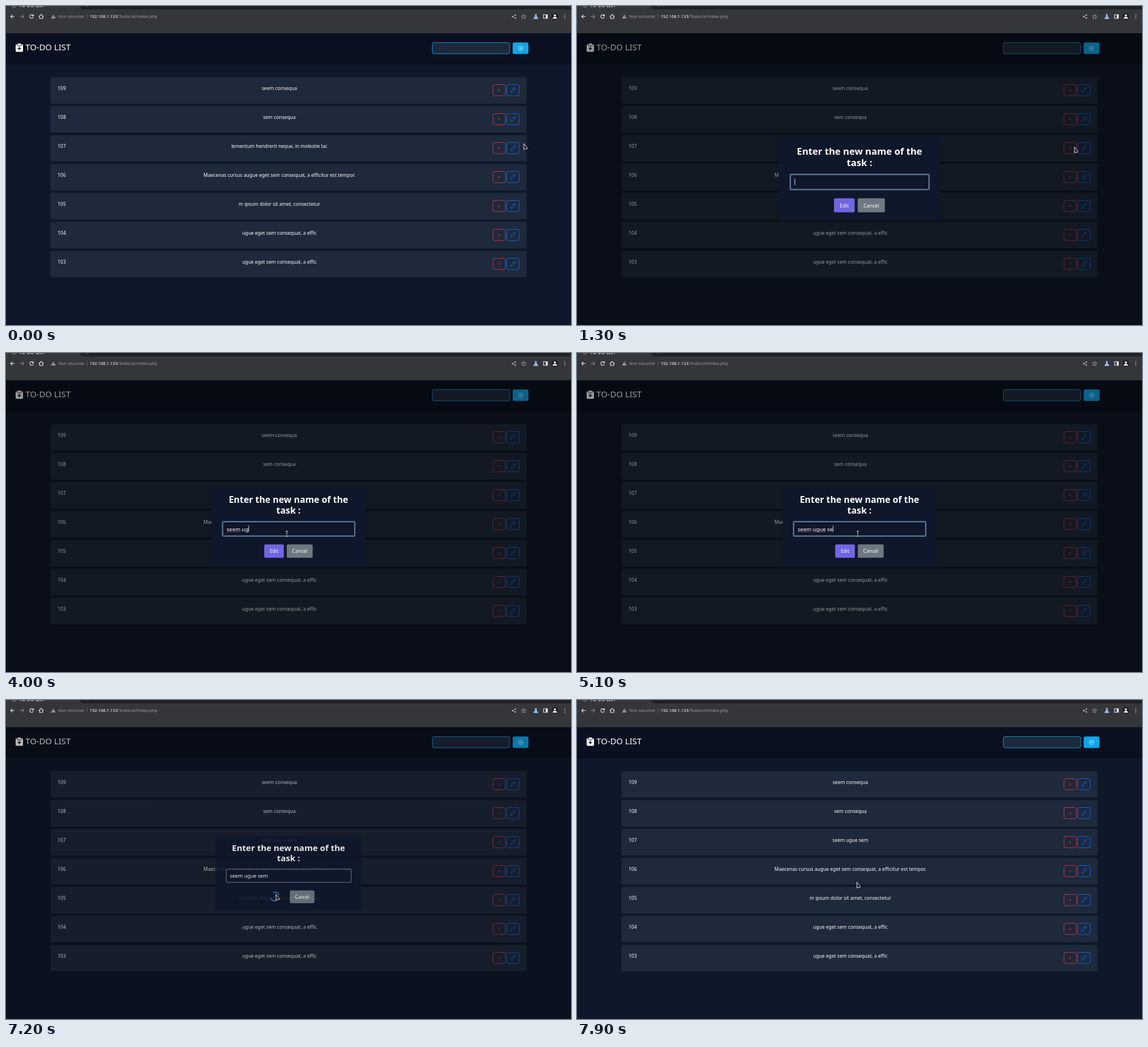
Write an HTML page that moves like this. It is 996 px wide and 562 px high and loops after 8 s.

```html
<!DOCTYPE html>
<html lang="en">
<head>
<meta charset="utf-8">
<title>To-do list</title>
<style>
  html, body { margin: 0; width: 100%; height: 100%; overflow: hidden; background: #0f172a; }
  svg { display: block; width: 996px; height: 562px; }
  text { font-family: "Noto Sans", "Open Sans", sans-serif; font-size: 8.47px; fill: #fff; }
  .mid { text-anchor: middle; }
  .url { font-size: 7.5px; }
  .mute { fill: #9aa0a6; }
  .line { fill: none; stroke: #e8eaed; stroke-width: 1.1; }
  .dim { stroke: #84878c; }
  .btn { fill: none; stroke-width: .9; }
  .del { stroke: #dc3545; }
  .edit { stroke: #0d6efd; }
  .icon { fill: none; stroke-width: .8; stroke-linejoin: round; }
  .hot .btn { fill: #0d6efd; }
  .hot .icon { stroke: #fff; }
  .brand { font-size: 14.8px; font-weight: 500; }
  .heading { font-size: 15.85px; font-weight: 700; }
  .label { font-weight: 500; }
  .typed { font-size: 9.5px; }
  .wavy { stroke: #e5384a; stroke-dasharray: 1.1 .9; }
</style>
</head>
<body>
<svg viewBox="0 0 996 562">
  <!-- browser bar -->
  <rect width="996" height="48" fill="#35363a"/>
  <path d="M131 0Q131.500 6 136 6H996V0Z" fill="#202124"/>
  <text x="23" y="1.800">TO-DO LIST</text>
  <circle class="line dim" cx="14.500" cy="-1" r="3.200"/>
  <path class="line dim" d="M141 -1H147M144 -3V1.500"/>
  <path class="line" d="M15 18.500H8.500M11.500 15.300L8.200 18.500L11.500 21.700"/>
  <path class="line dim" d="M24.500 18.500H31M28 15.300L31.300 18.500L28 21.700"/>
  <path class="line" d="M47.700 16.700A3.200 3.200 0 1 0 48.200 19.400M48.400 14.800V17.500H45.700"/>
  <path class="line" d="M57.700 18.800L62 14.800L66.300 18.800M59.300 17.700V22H64.700V17.700"/>
  <path d="M83.500 14.700L87.600 22H79.400Z" fill="#9aa0a6"/>
  <path d="M83.500 17.200V19.500M83.500 20.200V21" stroke="#35363a" stroke-width=".8"/>
  <text class="url mute" x="92" y="21.300">Non sécurisé</text>
  <path d="M143 14V23" stroke="#6b6e73" stroke-width=".8"/>
  <text class="url" x="147.500" y="21.300">192.168.1.133<tspan class="mute">/TodoList/index.php</tspan></text>
  <g fill="#c4c7cb" stroke="#c4c7cb" stroke-width=".7">
    <path d="M898 16L893 18.700L898 21.300" fill="none"/>
    <circle cx="898" cy="16" r=".9"/><circle cx="893" cy="18.700" r=".9"/><circle cx="898" cy="21.300" r=".9"/>
    <path fill="none" d="M912.500 14.700L913.600 17.400L916.500 17.600L914.300 19.500L915 22.300L912.500 20.800L910 22.300L910.700 19.500L908.500 17.600L911.400 17.400Z"/>
  </g>
  <path d="M932.300 14.800H935.700M933 15V17.700L930.300 21.700Q930 22.500 931 22.500H937Q938 22.500 937.700 21.700L935 17.700V15Z" fill="#8ab4f8" stroke="#c6dafc" stroke-width=".6"/>
  <path d="M947.600 15.300H954.400V21.700H947.600Z" class="line"/>
  <path d="M951.500 15.300H954.400V21.700H951.500Z" fill="#e8eaed"/>
  <circle cx="967.500" cy="18.500" r="6" fill="#202124"/>
  <circle cx="967.500" cy="16.700" r="1.900" fill="#fff"/>
  <path d="M963.700 22.300Q963.700 19.300 967.500 19.300T971.300 22.300Z" fill="#fff"/>
  <path d="M985 15.500V22" stroke="#e8eaed" stroke-width="1.600" stroke-linecap="round" stroke-dasharray="0 3"/>

  <!-- page -->
  <rect y="48" width="996" height="514" fill="#0f172a"/>
  <rect y="48" width="996" height="55" fill="#0a1020"/>
  <rect x="17" y="67.500" width="13" height="13.300" rx="1.800" fill="#fff"/>
  <rect x="20" y="65.800" width="7" height="4.500" rx="1" fill="#fff" stroke="#0a1020" stroke-width=".9"/>
  <path d="M23.500 72V78M20.500 75H26.500" stroke="#0a1020" stroke-width="1.500"/>
  <text class="brand" x="34.300" y="78">TO-DO LIST</text>
  <rect x="751.500" y="64.500" width="136.300" height="19.700" rx="3" fill="#1e293b" stroke="#0ea5e9" stroke-width=".9"/>
  <rect x="893.200" y="64.200" width="27.800" height="20.300" rx="3" fill="#0ea5e9"/>
  <g fill="none" stroke="#fff" stroke-width=".7">
    <circle cx="907.200" cy="74.500" r="3.900"/><path d="M905.300 74.500H909.100M907.200 72.600V76.400"/>
  </g>
  <g id="rows"></g>
  <rect id="shade" y="48" width="996" height="514"/>

  <!-- dialog -->
  <g id="dialog">
    <rect x="362.500" y="236" width="271" height="138" rx="2.600" fill="#0f172a"/>
    <text class="heading mid" x="498" y="264">Enter the new name of the</text>
    <text class="heading mid" x="498" y="283.300">task :</text>
    <rect id="ring" x="381.200" y="296.500" width="234.200" height="26.600" rx="2" fill="none" stroke="#6496c8" stroke-opacity=".5" stroke-width="1.600"/>
    <rect id="field" x="382.200" y="297.500" width="232.200" height="24.600" rx="1.500" fill="none" stroke-width=".7"/>
    <text id="typed" class="typed" x="389" y="313.600"></text>
    <path id="marks" class="wavy"/>
    <rect id="caret" y="304" width=".8" height="11.300" fill="#fff"/>
    <g id="confirm">
      <rect id="confirmBox" x="455.200" y="337.200" width="34.600" height="23.600" rx="2"/>
      <text class="label mid" x="472.500" y="352.200">Edit</text>
    </g>
    <circle id="loader" cx="472.700" cy="348.600" r="8.300" fill="none" stroke="#2778c4" stroke-width="2.100" pathLength="4" stroke-dasharray="1 1"/>
    <g id="cancel">
      <rect x="495" y="337.200" width="45.600" height="23.600" rx="2" fill="#6e7881"/>
      <text class="label mid" x="517.800" y="352.200">Cancel</text>
    </g>
  </g>

  <path id="arrow" d="M0 0L.3 10.300L2.700 8.900L5.700 9.200L6.100 6.900Z" fill="#16181c" stroke="#fff" stroke-width=".9" stroke-linejoin="round"/>
  <g id="beam" fill="none">
    <path d="M-2 -4.600H2M0 -4.600V4.600M-2 4.600H2" stroke="#000" stroke-width="2"/>
    <path d="M-2 -4.600H2M0 -4.600V4.600M-2 4.600H2" stroke="#fff" stroke-width=".9"/>
  </g>
</svg>
<script>
const LOOP = 8000, STEP = 100;
const OPEN = 1300, CONFIRM = 7000, CLOSE = 7170, CLOSED = 7400;
const KEY_GAP = 170, BLINK = 600, SPELL_DELAY = 1000;

const $ = id => document.getElementById(id);
const show = (id, on) => { $(id).style.display = on ? '' : 'none'; };
const set = (id, name, value) => $(id).setAttribute(name, value);
const part = (t, start, length) => Math.min(1, Math.max(0, (t - start) / length));
const smooth = u => u * u * (3 - 2 * u);
const inside = ([x, y], left, top, right, bottom) => x > left && x < right && y > top && y < bottom;

const tasks = [
  'seem consequa', 'sem consequa', 'lementum hendrerit neque, in molestie lac',
  'Maecenas cursus augue eget sem consequat, a efficitur est tempor.',
  'm ipsum dolor sit amet, consectetur',
  'ugue eget sem consequat, a effic', 'ugue eget sem consequat, a effic'
];
const EDITED = 2;

$('rows').innerHTML = tasks.map((task, i) => `
  <g transform="translate(0 ${i * 51})">
    <rect x="78.300" y="125.300" width="839.400" height="46.700" rx="3" fill="#1e293b"/>
    <text x="91" y="147.600">${109 - i}</text>
    <text class="mid name" x="481.900" y="147.600">${task}</text>
    <rect class="btn del" x="858.500" y="138.500" width="21.900" height="19.700" rx="3"/>
    <path class="icon del" d="M867.500 146.700L871 150.200M871 146.700L867.500 150.200"/>
    <g class="pen">
      <rect class="btn edit" x="882.800" y="138.500" width="21.900" height="19.700" rx="3"/>
      <path class="icon edit" d="M889.800 152.700L890.500 149.600L895.600 144.200L897.800 143.900L897.500 146.200L892.700 151.700ZM894.300 145.500L896.400 147.500"/>
    </g>
  </g>`).join('');
const editedName = document.querySelectorAll('.name')[EDITED];
const editedPen = document.querySelectorAll('.pen')[EDITED];

// bursts of typing at an even pace, with pauses between them
const bursts = [[2480, 'seem u'], [3930, 'gue '], [4840, 'sem']];
const keys = bursts.flatMap(([start, part]) =>
  [...part].map((char, i) => ({ char, time: start + i * KEY_GAP })));
const newName = keys.map(k => k.char).join('');

// pointer moves: start, end, then where it comes to rest
const home = [912.8, 242.6];
const moves = [
  [0, 500, 900, 259], [500, 900, 895.8, 250.8], [1200, 1300, 876.8, 248.5],
  [1300, 2000, 495, 318.6], [5300, 5600, 496, 318], [6300, 6600, 475.8, 342.6],
  [7300, 7600, 484.5, 322], [7700, 7900, 493.2, 321]
];

function pointer(t) {
  return moves.reduce(([x, y], [start, end, toX, toY]) => {
    const u = smooth(part(t, start, end - start));
    return [x + (toX - x) * u, y + (toY - y) * u];
  }, home);
}

function drawTyping(t, focused) {
  const done = keys.filter(k => k.time <= t);
  const text = done.map(k => k.char).join('');
  const last = done.length ? done[done.length - 1].time : OPEN - STEP;
  const label = $('typed');
  label.textContent = text.replace(/ /g, '\u00a0');
  set('caret', 'x', 389 + (text ? label.getComputedTextLength() : 0));
  show('caret', focused && Math.floor((t - last) / BLINK) % 2 === 0);

  // a word is marked once a space follows it or the typing rests
  const words = [...text.matchAll(/\S+/g)].filter(w =>
    text[w.index + w[0].length] === ' ' || t - last >= SPELL_DELAY);
  set('marks', 'd', words.map(w => {
    const from = label.getStartPositionOfChar(w.index).x;
    const to = label.getEndPositionOfChar(w.index + w[0].length - 1).x;
    return `M${from} 315.2H${to}`;
  }).join(''));
  show('marks', focused);
}

function drawDialog(t, point) {
  const busy = t >= CONFIRM;
  const leave = smooth(part(t, CLOSE, 150));
  const bounce = t < OPEN + 200 ? .05 * Math.cos(Math.PI * (t - OPEN) / 100) : 0;
  set('shade', 'opacity', .4 * (1 - part(t, CLOSE, 100)));
  set('dialog', 'opacity', 1 - leave);
  set('dialog', 'transform', `translate(498 305) scale(${1 + bounce - leave / 2}) translate(-498 -305)`);
  drawTyping(t, !busy);

  show('ring', !busy);
  set('field', 'stroke', busy ? '#b5bac2' : '#b4dbed');
  show('confirm', !busy);
  set('confirmBox', 'fill', inside(point, 455, 337, 490, 361) ? '#655cca' : '#7066e0');
  show('loader', busy);
  set('loader', 'transform', `rotate(${(t - CONFIRM - 100) * .24 - 135} 472.7 348.6)`);
  set('cancel', 'transform', `translate(${busy ? 5.6 : 0} 0)`);
}

function draw(t) {
  const open = t >= OPEN && t < CLOSED;
  const point = pointer(t);
  const beam = open && inside(point, 381, 297, 615, 323);

  editedName.textContent = t >= CLOSE ? newName : tasks[EDITED];
  editedPen.classList.toggle('hot', t < OPEN && inside(point, 883, 240, 905, 260));
  show('shade', open);
  show('dialog', open);
  if (open) drawDialog(t, point);
  show('arrow', !beam);
  show('beam', beam);
  set(beam ? 'beam' : 'arrow', 'transform', `translate(${point})`);
}

const began = performance.now();
function tick() {
  const t = (performance.now() - began) % LOOP;
  draw(Math.floor(t / STEP) * STEP);
  requestAnimationFrame(tick);
}
tick();
</script>
</body>
</html>
```
